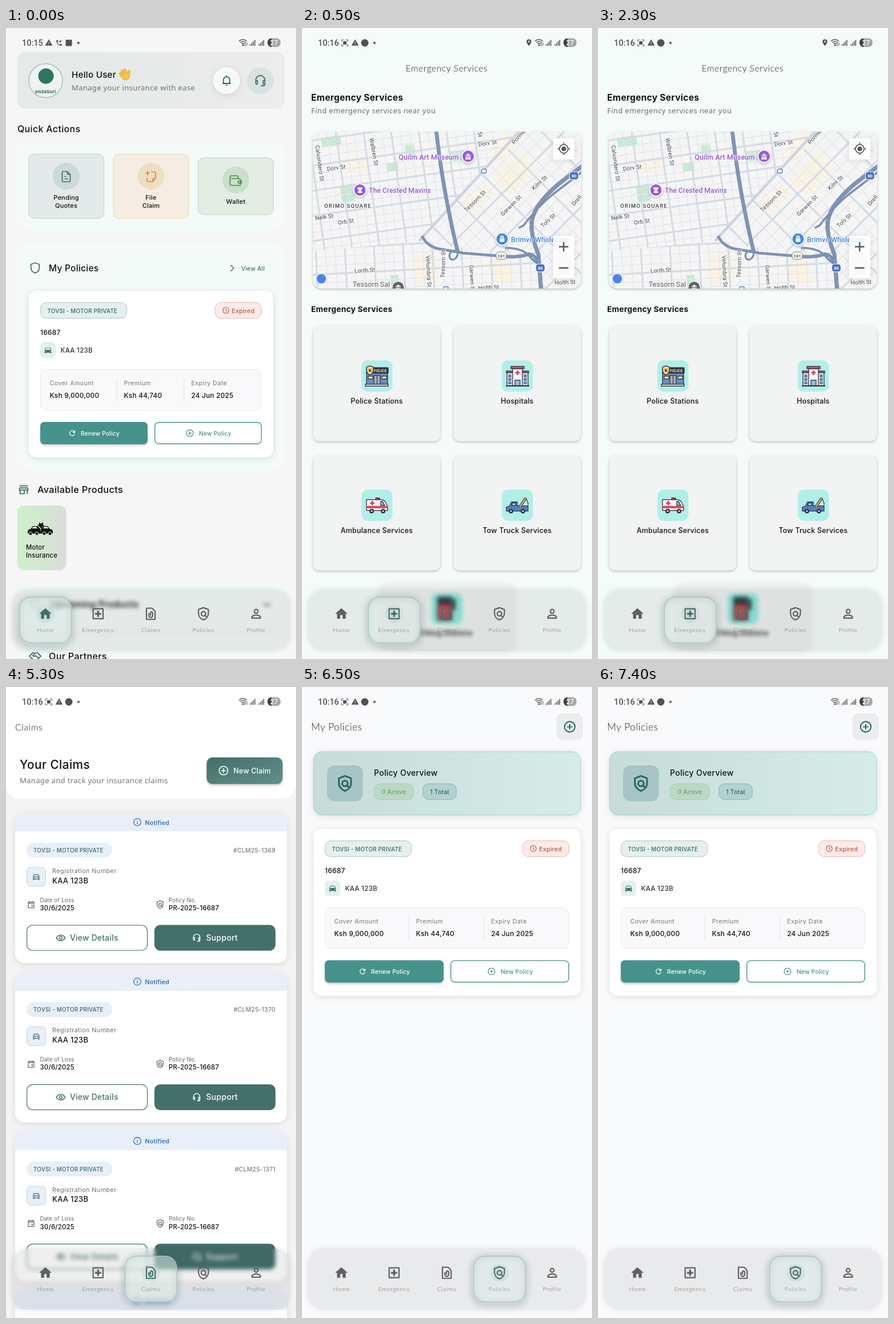
Write an HTML page that moves like this. It is 508 by 1102 pixels and loops after 8 s.

```html
<!DOCTYPE html>
<html lang="en">
<head>
<meta charset="utf-8">
<title>Insurance app tour</title>
<style>
html, body { margin: 0; width: 100%; height: 100%; overflow: hidden; background: #f6f6f6; }
.screen { position: absolute; left: 0; top: 0; width: 508px; height: 1102px; overflow: hidden; }
svg { position: absolute; left: 0; top: 0; display: block; }
text { font-family: Inter, sans-serif; letter-spacing: .02em; white-space: pre; }
text.note { font-family: "Noto Sans", sans-serif; letter-spacing: .35px; }
text.hand { font-family: Lato, sans-serif; letter-spacing: .6px; }
text.map { font-family: Roboto, sans-serif; letter-spacing: .1px; stroke: #fffc; stroke-width: 2px; paint-order: stroke; }
text.sys { font-family: Roboto, sans-serif; letter-spacing: 0; }
.soft { filter: drop-shadow(0 2px 6px #0000001c); }
.lift { filter: drop-shadow(0 2px 2px #00000038); }
.glow { filter: blur(5px); }
.bar { position: absolute; left: 10px; top: 980px; width: 488px; height: 108px; border-radius: 30px;
  background: #00000010; box-shadow: 0 0 8px 2px #00000010; backdrop-filter: blur(3.5px); }
</style>
</head>
<body>
<script>
const W = 508, H = 1102, LOOP = 8000;
const PINE = '#44706a', TEAL = '#45938c', INK = '#111', GREY = '#777';

const rect = (x, y, w, h, r, fill, more = '') =>
  `<rect x="${x}" y="${y}" width="${w}" height="${h}" rx="${r}" fill="${fill}" ${more}/>`;
const disc = (x, y, r, fill, more = '') => `<circle cx="${x}" cy="${y}" r="${r}" fill="${fill}" ${more}/>`;
const path = (d, fill, more = '') => `<path d="${d}" fill="${fill}" ${more}/>`;
const line = (d, color, w, more = '') => path(d, 'none', `stroke="${color}" stroke-width="${w}" ${more}`);
const text = (x, y, s, size, fill = INK, weight = 500, more = '') =>
  `<text x="${x}" y="${y}" font-size="${size}" fill="${fill}" font-weight="${weight}" ${more}>${s}</text>`;
const mid = 'text-anchor="middle"', end = 'text-anchor="end"';
const note = (x, y, s) => text(x, y, s, 13, '#707070', 400, 'class="note"');
const edge = (c, w = 1) => `stroke="${c}" stroke-width="${w}"`;
// Box whose 1px border lies inside its bounds.
const box = (x, y, w, h, r, fill, border, more = '') =>
  rect(x + .5, y + .5, w - 1, h - 1, r, fill, edge(border) + ' ' + more);
const at = (x, y, body) => `<g transform="translate(${x} ${y})">${body}</g>`;
const ring = (x, y, r) => `M${x - r} ${y}a${r} ${r} 0 1 0 ${2 * r} 0a${r} ${r} 0 1 0 ${-2 * r} 0`;

// Icons on a 24 unit grid: f is filled, s is stroked, b is a bold stroke.
const ICONS = {
  home: { f: 'M10 20v-6h4v6h5v-8h3L12 3 2 12h3v8z' },
  aid: { s: 'M4 4h16v16H4z', b: 'M12 7v10M7 12h10' },
  claim: { s: 'M5 3h9l5 5v13H5zM9 11v4a3 3 0 0 0 6 0v-4.500a1.800 1.800 0 0 0-3.500 0V15' },
  shield: { s: 'M12 2.200 4 5.200v6c0 5 3.400 9 8 10.600 4.600-1.600 8-5.600 8-10.600v-6z' },
  policy: { s: 'M12 2.200 4 5.200v6c0 5 3.400 9 8 10.600 4.600-1.600 8-5.600 8-10.600v-6zM14.500 14.500 18 18' + ring(12, 12, 3.6) },
  person: { s: 'M5 19v-1c0-2.500 4.500-4 7-4s7 1.500 7 4v1z' + ring(12, 8, 3) },
  warn: { f: 'M1 21h22L12 2zm12-3h-2v-2h2zm0-4h-2v-4h2z' },
  call: { f: 'M6.600 10.800c1.400 2.800 3.800 5.100 6.600 6.600l2.200-2.200 1-.2 3.600.6 1 1V20l-1 1C10.600 21 3 13.400 3 4l1-1h3.500l1 1 .5 3.600-.2 1z', s: 'M14 9l6-6M14 4v5h5' },
  photo: { s: 'M3 8V3h5M16 3h5v5M21 16v5h-5M8 21H3v-5', f: 'M7 7h10v10H7z' },
  pin: { f: 'M12 2a7 7 0 0 0-7 7c0 5.250 7 13 7 13s7-7.750 7-13a7 7 0 0 0-7-7zm0 9.500a2.500 2.500 0 1 1 0-5 2.500 2.500 0 0 1 0 5z' },
  bell: { s: 'M6 17v-6.500a6 6 0 0 1 12 0V17zM4 17.500h16M12 2v3', f: 'M10 20h4a2 2 0 0 1-4 0z' },
  headset: { s: 'M4 13v-2a8 8 0 0 1 16 0v7q0 3-4 3h-3M4 12h3v6H6q-2 0-2-2zM20 12h-3v6h3' },
  doc: { s: 'M6 3h8l5 5v11q0 2-2 2H7q-2 0-2-2V5q0-2 2-2M14 3v5h5M9 12h3M9 16h6' },
  addDoc: { s: 'M12 4h6q2 0 2 2v9l-5 6H8q-3 0-3-3v-4M15 21v-4q0-2 2-2h3M6 2v8M2 6h8' },
  wallet: { s: 'M4 9h14q2 0 2 2v8q0 2-2 2H5q-3 0-3-3V7q0-3 3-3h9q2 0 2 2v3M22 13h-4a2 2 0 0 0 0 4h4z' },
  car: { f: 'M18.900 6 17.500 5h-11L5.100 6 3 12v8l1 1h1l1-1v-1h12v1l1 1h1l1-1v-8zM6.500 16a1.500 1.500 0 1 1 0-3 1.500 1.500 0 0 1 0 3zm11 0a1.500 1.500 0 1 1 0-3 1.500 1.500 0 0 1 0 3zM5 11l1.500-4.500h11L19 11z' },
  carLine: { s: 'M4 12v8h2v-2h12v2h2v-8l-2-6H6zM4 12h16M7 15h2M15 15h2' },
  clock: { s: ring(12, 12, 9) + 'M12 7v5.500l4 2.500' },
  plus: { s: ring(12, 12, 9.5) + 'M12 7v10M7 12h10' },
  info: { s: ring(12, 12, 9.5) + 'M12 11v6M12 7v2' },
  renew: { f: 'M17.650 6.350A8 8 0 1 0 19.730 14h-2.080A6 6 0 1 1 12 6c1.660 0 3.140.7 4.220 1.780L13 11h7V4z' },
  store: { s: 'M3.500 5h17M4.500 9h15l1 4h-17zM5 13v7h8v-7M19 13v7.500' },
  eye: { s: 'M1.500 12q4-6.500 10.500-6.500T22.500 12q-4 6.500-10.500 6.500T1.500 12z' + ring(12, 12, 3.2) },
  date: { s: 'M4 5h16v16H4zM4 8h16M8 2v3M16 2v3', f: 'M13 13h4v4h-4z' },
  hands: { s: 'M2 11l6-6 4 1 4-1 6 6-9 9q-2 1-3-1zM12 6 8 10q2 3 5 0l5 5M7 15l3 3' },
};
const icon = (name, cx, cy, size, color, w = 2) => {
  const k = ICONS[name], z = size / 24;
  return `<g transform="translate(${cx - size / 2} ${cy - size / 2}) scale(${z})">` +
    (k.f ? path(k.f, color, 'fill-rule="evenodd"') : '') +
    (k.s ? line(k.s, color, w, 'stroke-linejoin="round"') : '') +
    (k.b ? line(k.b, color, 3) : '') + '</g>';
};

const DEFS = () => {
  const grad = (id, a, b, more = '') =>
    `<linearGradient id="${id}" ${more}><stop stop-color="${a}"/><stop offset="1" stop-color="${b}"/></linearGradient>`;
  return '<defs>' + grad('head', '#e4e9e9', '#ececec') + grad('motor', '#cdf1c8', '#dbdcdb') +
    grad('claimBtn', '#426f69', '#62908a', 'y2="1"') + grad('over', '#c7dcd9', '#d6ece8') +
    '<clipPath id="mapBox"><rect x="19" y="181" width="470" height="274" rx="16"/></clipPath>' +
    '<clipPath id="west"><path d="M0 160H395L205 372 0 392z"/></clipPath>' +
    '<clipPath id="east"><path d="M400 170H500V470H430L400 395 270 382 205 372z"/></clipPath>' +
    '<clipPath id="south"><path d="M0 392 205 372 270 382 400 395 430 470H0z"/></clipPath></defs>';
};

function status(late, pin) {
  const c = '#505254';
  let s = text(28, 31, late ? '10:16' : '10:15', 14.500, c, 500, 'class="sys"');
  s += late
    ? icon('photo', 75, 26, 14, c) + icon('warn', 93, 25.500, 14, c) + disc(110, 26, 6.500, c)
    : icon('warn', 75, 25.500, 14, c) + icon('call', 93, 26, 13, c) + rect(104.500, 20.500, 11, 11, 0, c);
  s += disc(127, 26, 2, c);
  if (pin) s += icon('pin', 397.500, 25.500, 14, c);
  for (const r of [3, 6, 9]) s += line(`M${415 - r * .75} ${30 - r * .75}a${r} ${r} 0 0 1 ${r * 1.5} 0`, c, 1.300);
  s += disc(415, 30, 1.500, c) + line('M419 25v6m-1.500-2l1.500 2M422 31v-6', c, 1);
  for (const x of [427, 442.500])
    for (let i = 0; i < 4; i++) s += rect(x + i * 2.700, 28.500 - i * 2.600, 1.500, 2.500 + i * 2.600, 0, c);
  return s + rect(458, 18, 23, 15, 7, '#a2a4a5') + path('M465 18v15a7 7.500 0 0 1 0-15z', '#3e4042') +
    text(469.500, 30, '27', 12, '#fff', 500, mid + ' class="sys"');
}

function navBar(active) {
  const items = [['home', 'Home'], ['aid', 'Emergency'], ['claim', 'Claims'], ['policy', 'Policies'], ['person', 'Profile']];
  return items.map(([ic, label], i) => {
    const x = 69 + i * 92.300, on = i === active;
    const frame = () => rect(x - 46, 996, 92, 82, 21, 'none', edge('#3a5f5a38', 9) + ' class="glow"') +
      rect(x - 45, 994, 90.500, 80, 20, '#dcebe88c', edge('#a9c5bf', 1.300)) + disc(x, 1023, 16, '#44706a16');
    return (on ? frame() : '') + icon(ic, x, 1023, 26, on ? PINE : '#5f6162') +
      text(x, 1055, label, 10.500, on ? '#5f7f7b' : '#6c6c6c', 300, mid + ' class="hand"');
  }).join('');
}

function policyCard(x, y, w) {
  const L = x + 20, R = x + w - 20, iw = w - 40, col = (iw - 34) / 3, bw = (iw - 12) / 2;
  const facts = [['Cover Amount', 'Ksh 9,000,000'], ['Premium', 'Ksh 44,740'], ['Expiry Date', '24 Jun 2025']];
  let s = rect(x, y, w, 291, 14, '#fff', 'class="soft"') +
    box(L, y + 20, 152, 28.500, 10, '#e6efee', '#a5c8c1') +
    text(L + 12.500, y + 38.500, 'TOVSI - MOTOR PRIVATE', 9.900, '#2f6e64') +
    box(R - 82, y + 20, 82, 28.500, 10, '#fbebea', '#e6b8ad') +
    icon('clock', R - 63, y + 34, 14, '#c6543e') + text(R - 52.500, y + 38.500, 'Expired', 10.600, '#c6543e') +
    text(L, y + 77, '16687', 12) +
    rect(L, y + 90, 27, 27, 6, '#e6efee') + icon('car', L + 13.500, y + 103.500, 15, '#2f6e64') +
    text(L + 35.500, y + 107.500, 'KAA 123B', 11.600, '#333', 500) +
    box(L, y + 137, iw, 72, 10, '#f9f9fb', '#e6e8ea');
  facts.forEach(([k, v], i) => {
    const tx = L + (i ? 28.500 + col * i : 16.500);
    if (i) s += line(`M${L + 16 + col * i} ${y + 154}v39`, '#dcdfe1', 1);
    s += text(tx, y + 165, k, 10.700, GREY, 400, 'style="letter-spacing:.04em"') + text(tx, y + 187, v, 11.800);
  });
  const a = L + bw / 2, b = R - bw / 2;
  return s + rect(L, y + 229, bw, 39, 7, TEAL, 'class="lift"') +
    icon('renew', a - 38, y + 248.500, 15, '#fff') + text(a - 23, y + 252.500, 'Renew Policy', 10.300, '#fff') +
    rect(L + bw + 12.700, y + 229.700, bw - 1.400, 37.600, 7, '#fff', edge(TEAL, 1.400)) +
    icon('plus', b - 32, y + 248.500, 15, TEAL) + text(b - 16, y + 252.500, 'New Policy', 10.300, TEAL);
}

function home() {
  const panel = (y, h) => rect(20, y, 468, h, 16, '#f3faf8');
  const tile = (x, y, h, fill, stroke, round, ic, color, words) =>
    box(x, y, 133, h, 10, fill, stroke) + disc(x + 66.500, y + 39.500, 23.500, round) +
    icon(ic, x + 66.500, y + 40, 24, color, 1.700) +
    words.map((s, i) => text(x + 66.500, y + 80.500 + i * 14, s, 11, INK, 500, mid)).join('');
  const hand = path('M-9-3l3-2 5 6-5-9 3-1 5 8-3-9 3-1 4 9 1-6 3 0 0 9q-1 7-7 8-5 0-8-5z', '#f7c548', edge('#d99a2b', .8));
  const crash = path('M-22 4q1-4 5-4l4-5h9l4 5 2 8h-24zM22 4q-1-4-5-4l-4-5H5L1 0l1 8h20zM-5-7l3-1 0-4 3 3 4-3 0 5 3 2-5 1-1 4-3-4z', '#111') +
    [-17, -6, 7, 17].map(x => disc(x, 8, 3, '#111', edge('#d5e8d2'))).join('') +
    path('M-15-1l3-3h5l2 3zM15-1l-3-3H7L5-1z', '#d5e8d2');
  return rect(20, 42, 468, 99, 14, 'url(#head)') +
    disc(69.500, 92, 29.500, '#eff2f2', edge('#a8c2be', 1.500)) + disc(70, 84, 13.500, '#2f7560') +
    text(69, 113.500, 'ondaSuri', 8, '#2c6a58', 700, mid) +
    text(115, 87, 'Hello User', 15.100) + at(207, 82, hand) + note(115, 109, 'Manage your insurance with ease') +
    disc(386.500, 92, 23.500, '#f5faf9', 'class="soft"') + icon('bell', 386.500, 92, 22, '#2b6860') +
    disc(445.500, 92, 23.500, '#d8e2e1') + icon('headset', 445.500, 92, 24, PINE, 1.800) +
    text(20, 182, 'Quick Actions', 16) + panel(200, 152) +
    tile(39, 219.500, 113.500, '#e3eae9', '#c3d3d1', '#cbd9d8', 'doc', PINE, ['Pending', 'Quotes']) +
    tile(187.500, 219.500, 113.500, '#f5ede1', '#ecd6b2', '#eedfc3', 'addDoc', '#e08a2c', ['File', 'Claim']) +
    tile(336, 226, 100.500, '#e3ede4', '#bfd7c2', '#cadfca', 'wallet', '#4c8a50', ['Wallet']) +
    panel(377, 394) + icon('shield', 51, 419, 22, PINE) + text(75, 425, 'My Policies', 15.400) +
    line('M393.500 414l5.500 5.500-5.500 5.500', PINE, 1.500) + text(412, 424, 'View All', 10.300, PINE) +
    policyCard(40, 459, 428) +
    icon('store', 31, 806, 22, PINE) + text(55, 812, 'Available Products', 16.300) +
    rect(20, 834, 85.500, 113, 12, 'url(#motor)') + at(60, 875, crash) +
    text(35, 910.500, 'Motor', 11.200) + text(35, 925, 'Insurance', 11.200) +
    panel(971, 78) + icon('shield', 51, 1008, 20, '#8fb5a8') + text(78, 1012, 'Upcoming Products', 15.600, INK, 600) +
    line('M451 1004l6 6 6-6', '#667', 2) +
    panel(1062, 60) + icon('hands', 51, 1098, 24, PINE, 1.800) + text(75, 1103, 'Our Partners', 16.100);
}

function grid(zone, x, y, turn, dx, dy) {
  let minor = '', major = '';
  for (let i = -14; i <= 14; i++) {
    const d = `M${i * dx}-420V420M-420 ${i * dy}H420`;
    if (i % 3) minor += d; else major += d;
  }
  return `<g clip-path="url(#${zone})"><g transform="translate(${x} ${y}) rotate(${turn})">` +
    line(minor, '#e5e8ed', 1.600) + line(major, '#d6dbe4', 3.200) + '</g></g>';
}

function cityMap() {
  const street = (x, y, turn, s) =>
    `<g transform="translate(${x} ${y}) rotate(${turn})">${text(0, 3.500, s, 10, '#3c4043', 400, mid + ' class="map"')}</g>`;
  const patch = (x, y, w, h, turn, fill) => `<g transform="translate(${x} ${y}) rotate(${turn})">${rect(0, 0, w, h, 2, fill)}</g>`;
  const green = '#c8ead2', sand = '#faf3e2';
  const poi = (x, y, c, glyph) => path(`M${x - 5} ${y + 9}L${x} ${y + 14}l5-5z`, '#fff') +
    disc(x, y, 11.500, '#fff', 'class="lift"') + disc(x, y, 10, c) + at(x, y, path(glyph, '#fff'));
  const temple = 'M-5-1L0-5l5 4zM-4 0h2v4h-2zM-1 0h2v4h-2zM2 0h2v4H2zM-5 4H5v1.500H-5z';
  const tower = 'M-4-5h2v2h1v-2h2v2h1v-2h2v4H2l1 4h1v2h-8V3h1l1-4h-2z';
  const bag = 'M-4-1h8v6h-8zM-3-1v-2a3 3 0 0 1 6 0v2H1v-2a1 1 0 0 0-2 0v2z';
  const road = (d, w) => line(d, '#667da4', w + 1) + line(d, '#7f94b8', w);
  const sign = (x, y) => rect(x - 8, y - 7, 16, 14, 5, '#4c74bd', edge('#fff')) + text(x, y + 3, '80', 7.500, '#fff', 700, mid + ' class="sys"');
  const streets = [
    [60, 244, -8, 'Dorv St'], [126, 216, 80, 'Walbren St'], [31, 236, 82, 'Calvondero St'], [325, 201, -8, 'Dorv St'],
    [303, 302, -45, 'Tessorn St'], [366, 310, -45, 'Garwen St'], [380, 189, -48, 'Pormel'], [416, 270, -42, 'Kilm St'],
    [431, 336, -42, 'Tolv St'], [39, 330, -8, 'Nelk St'], [77, 338, -8, 'Orb St'], [110, 423, -4, 'Lorth St'],
    [222, 425, 87, 'Velumbra St'], [247, 412, -88, 'Tessorn St'], [298, 437, 87, 'Garwen St'], [327, 453, -2, 'Holth St'],
    [461, 444, -2, 'Holth St'], [481, 301, -50, 'Drell'], [312, 186, 82, 'St']];
  return rect(19, 181, 470, 274, 16, '#f5f5f5', 'class="lift"') + '<g clip-path="url(#mapBox)">' +
    patch(33, 192, 34, 17, -8, green) + patch(66, 275, 24, 30, -8, green) + patch(147, 236, 20, 16, -8, green) +
    patch(180, 205, 16, 26, -8, green) + patch(258, 216, 26, 18, -8, green) + patch(155, 432, 14, 20, -4, green) +
    patch(365, 170, 30, 60, 42, sand) + patch(320, 270, 24, 54, 45, sand) + patch(385, 215, 42, 70, 45, sand) +
    patch(195, 395, 40, 50, -3, sand) + patch(68, 230, 46, 24, -8, sand) + patch(330, 405, 38, 40, -3, sand) +
    grid('west', 120, 270, -8, 16, 14.500) + grid('east', 350, 290, -45, 21, 19) + grid('south', 230, 420, -3, 17, 15) +
    line('M205 372L395 165', '#cfd5df', 5) +
    road('M235 178Q246 280 273 392', 5.500) + road('M210 363q10 20 32 23l40 7 62 5', 3.500) +
    road('M268 388q-13 5-9 13t12-1l3-10', 2) +
    road('M345 398q30 4 48-2t24 30l2 34', 5) + road('M492 240L450 272Q402 312 402 345q0 20 12 50l5 65', 6) +
    road('M490 252L440 290q-25 20-52 55l-8 4M356 384q30 0 42 14t18 14', 2.500) +
    streets.map(a => street(...a)).join('') +
    text(39, 314, 'ORIMO SQUARE', 9.500, '#444', 500, 'class="map" style="letter-spacing:1.2px"') +
    text(275, 230, 'Quilm Art Museum', 12.400, '#9156cf', 500, end + ' class="map"') + poi(291, 224, '#9a5be0', temple) +
    text(117, 288, 'The Crested Mavins', 12, '#9156cf', 500, 'class="map"') + poi(101.500, 283, '#9a5be0', tower) +
    text(366, 374, 'Brimvo Wholesale', 12.200, '#3f86d6', 500, 'class="map"') + poi(350.500, 368.500, '#3f8ee8', bag) +
    text(89, 452, 'Tessorn Sal', 12.300, '#555', 400, 'class="map"') + poi(168.500, 453, '#5f6670', temple) +
    rect(314.500, 246.500, 8, 7, 1.500, '#fff', edge('#3f86c8', 1.500)) + rect(248, 452, 8, 7, 1.500, '#fff', edge('#3f86c8', 1.500)) +
    sign(476.500, 258) + sign(417.500, 419) +
    rect(340, 391, 18, 13, 5, '#fff', edge('#777')) + text(349, 401, '101', 8, '#333', 500, mid + ' class="sys"') +
    disc(34, 438, 8, '#4285f4') +
    rect(440, 192.500, 37, 37, 2, '#fffffff0', 'class="soft"') + disc(458.500, 211, 4, '#555') +
    line(ring(458.500, 211, 7.500) + 'M458.500 200v4m0 14v4M447.500 211h4m14 0h4', '#555', 1.700) +
    rect(440, 363, 37, 74, 2, '#ffffffd8', 'class="soft"') +
    line('M450 382h16.500M458.250 373.750v16.500M450 419h16.500', '#555', 2.400) + '</g>';
}

function emergency() {
  const dark = edge('#26293a', 1.200);
  const wheels = (a, b, y) => [a, b].map(x => disc(x, y, 4, '#30323e') + disc(x, y, 1.600, '#ddd')).join('');
  const art = [
    rect(-18, -6, 37, 21, 0, '#668fc6', dark) + rect(-18, -15, 38, 10, 1, '#343643', dark) +
      text(6, -7.500, 'POLICE', 6.200, '#f0cf87', 800, mid + ' style="letter-spacing:0"') +
      path('M-18-16l6-2 6 2v6q-1 6-6 8-5-2-6-8z', '#f3cf79', dark) + disc(-12, -10, 2.500, '#6b5a34') +
      rect(-15, 0, 8, 5, 0, '#ffe39b', dark) + rect(9, 0, 8, 5, 0, '#ffe39b', dark) +
      rect(-5, -1, 11, 16, 0, '#a9adb5', dark) + line('M.5-1v16', '#26293a', 1) + rect(-20, 14, 40, 3.500, 0, '#cfd3da', dark),
    rect(-18, -7, 37, 24, 0, '#d9deea', dark) + rect(-19, -9, 12, 3, 0, '#d9505a', dark) + rect(8, -9, 12, 3, 0, '#d9505a', dark) +
      rect(-8, -13, 17, 30, 0, '#f4f5f8', dark) + rect(-11, -17, 23, 4, 0, '#d9505a', dark) +
      line('M.5-10v8M-3.500-6h8', '#df3f4a', 2.600) + rect(-4, 7, 9, 10, 0, '#8fb8e0', dark) +
      [-15, 12].map(x => [-2, 4, 10].map(y => rect(x, y, 4, 3.500, 0, '#6d9fd6', edge('#26293a', .7))).join('')).join('') +
      line('M-20 17h41', '#26293a', 2),
    path('M-18-10H8q6 0 9 8l2 4v7h-37z', '#f6f7fa', dark) + rect(-18, 1, 37, 4, 0, '#e0434c') +
      path('M7-7h3l4 7H7z', '#7cc0ea', dark) + line('M-8-8v8M-12-4h8', '#e0434c', 2.600) +
      rect(-2, -13, 7, 3, 1, '#e0434c', dark) + wheels(-9, 11, 10),
    path('M-19 3l6-2 3-7h10v7h19v9h-38z', '#4f83bf', dark) + path('M-10 0l2-4h5v4z', '#cfe6f5', dark) +
      line('M5 2L15-13', '#26293a', 4.500) + line('M5 2L15-13', '#f0b33f', 2.500) +
      line('M15-13l4 9v3', '#26293a', 1.200) + wheels(-11, 10, 10)];
  const names = ['Police Stations', 'Hospitals', 'Ambulance Services', 'Tow Truck Services'];
  const cards = names.map((name, i) => {
    const cx = 131 + (i % 2) * 246, y = 519.500 + (i >> 1) * 225.700;
    return rect(cx - 111.500, y, 223, 202, 11, '#f2f3f3', 'class="lift"') + rect(cx - 27, y + 61, 54.500, 54.500, 11, '#b0efe8') +
      at(cx, y + 88.500, art[i]) + text(cx, y + 136.500, name, 12.400, INK, 500, mid);
  }).join('');
  return text(253.500, 76, 'Emergency Services', 15.500, '#222', 300, mid + ' class="hand"') +
    text(16, 127, 'Emergency Services', 15.500, INK, 700) + note(16, 148.500, 'Find emergency services near you') +
    cityMap() + text(16, 496, 'Emergency Services', 13.700, INK, 700) + cards +
    rect(140, 971, 230, 113, 12, '#eef1f0', 'class="soft"') + rect(227, 987, 54, 54, 11, '#8fe9df') +
    rect(237, 993, 26, 42, 2, '#37444a') + rect(240, 1008, 20, 24, 2, '#e0474c') + rect(264, 997, 5, 20, 2, '#333') +
    text(253.500, 1061, 'Filling Stations', 12.400, INK, 600, mid);
}

function claimCard(y, id) {
  const blue = '#3a73b8', pale = '#e8eff9';
  return rect(16, y, 476, 262, 16, '#fff', 'class="soft"') +
    path(`M16 ${y + 32}v-16a16 16 0 0 1 16-16h444a16 16 0 0 1 16 16v16z`, pale) +
    icon('info', 230, y + 16, 16, blue) + text(243.500, y + 20.500, 'Notified', 10.600, blue, 600) +
    rect(36, y + 52, 150.500, 26, 13, pale) + text(48, y + 69, 'TOVSI - MOTOR PRIVATE', 9.900, '#3a6a72') +
    text(472, y + 69, '#CLM25-' + id, 10.600, '#666', 400, end) +
    box(36, y + 94.500, 34, 34, 7, pale, '#c5d2ea') + icon('carLine', 53, y + 111.500, 15, '#4a7183') +
    text(81, y + 105, 'Registration Number', 10.700, '#6c6c6c', 400, 'style="letter-spacing:.045em"') + text(81, y + 122.500, 'KAA 123B', 13) +
    icon('date', 44, y + 160, 15, '#666') + text(59.500, y + 155.500, 'Date of Loss', 9.700, '#666', 400) + text(59.500, y + 170, '30/6/2025', 11.400) +
    icon('policy', 270, y + 160, 16, '#666') + text(285, y + 155.500, 'Policy No.', 9.700, '#666', 400) + text(285, y + 170, 'PR-2025-16687', 11.300) +
    rect(36.600, y + 196, 211, 44, 10, '#fff', edge(PINE, 1.200)) + icon('eye', 96, y + 218, 18, PINE) +
    text(112, y + 223, 'View Details', 13.800, PINE) +
    rect(260, y + 195.500, 212, 45, 10, PINE) + icon('headset', 334, y + 218, 17, '#fff') + text(350.500, y + 223, 'Support', 14, '#fff');
}

function claims() {
  return path('M0 0H508V171a24 24 0 0 1-24 24H24a24 24 0 0 1-24-24z', '#fff') +
    text(16, 76, 'Claims', 15.800, '#222', 300, 'class="hand"') +
    text(24, 143, 'Your Claims', 20.800) + note(24, 167.500, 'Manage and track your insurance claims') +
    rect(351.500, 123, 133, 46.500, 10, 'url(#claimBtn)', 'class="lift"') + icon('plus', 381, 146, 19, '#fff') +
    text(398.500, 151, 'New Claim', 12.400, '#fff') +
    [0, 1, 2, 3].map(i => claimCard(220 + i * 278.400, 1369 + i)).join('');
}

function policies() {
  const pill = (x, w, s, fill, border, ink) => box(x, 168.500, w, 28.500, 10, fill, border) + text(x + w / 2, 187, s, 10.600, ink, 500, mid);
  return text(16, 76, 'My Policies', 17.200, '#222', 300, 'class="hand"') +
    rect(445.500, 46, 46.500, 46.500, 10, '#ebecee') + icon('plus', 469, 69.500, 23, '#2a6c61', 2.200) +
    box(19.500, 112.500, 469, 111.500, 15, 'url(#over)', '#a6d2cb', 'class="soft"') +
    rect(44, 137, 62.500, 62.500, 12, '#a6c5c4') + icon('policy', 75.300, 168.500, 32, '#2a655f', 2.200) +
    text(126, 155, 'Policy Overview', 14) +
    pill(126, 70, '0 Active', '#bbd8c6', '#a3cfae', '#64a668') + pill(211, 60, '1 Total', '#b2d1cf', '#86bab5', '#2a6963') +
    policyCard(20, 248.200, 468);
}

const SCREENS = [
  { from: 0, to: 500, bg: '#f6f6f6', draw: home },
  { from: 500, to: 3500, bg: '#f4fbf9', draw: emergency, pin: true },
  { from: 3500, to: 6500, bg: '#f4f4f4', draw: claims },
  { from: 6500, to: LOOP, bg: '#f9fafc', draw: policies },
];
const svg = body => `<svg width="${W}" height="${H}" viewBox="0 0 ${W} ${H}">${body}</svg>`;

SCREENS.forEach(({ from, to, bg, draw, pin }, i) => {
  const el = document.createElement('div');
  el.className = 'screen';
  el.style.background = bg;
  el.innerHTML = svg((i ? '' : DEFS()) + draw() + status(i > 0, pin)) + '<div class="bar"></div>' + svg(navBar(i));
  document.body.append(el);
  // Hard cuts: two steps share each offset.
  const a = from / LOOP, b = to / LOOP;
  const steps = [[1, a], [1, b]];
  if (a > 0) steps.unshift([0, 0], [0, a]);
  if (b < 1) steps.push([0, b], [0, 1]);
  el.animate(steps.map(([opacity, offset]) => ({ opacity, offset })), { duration: LOOP, iterations: Infinity });
});
</script>
</body>
</html>
```
